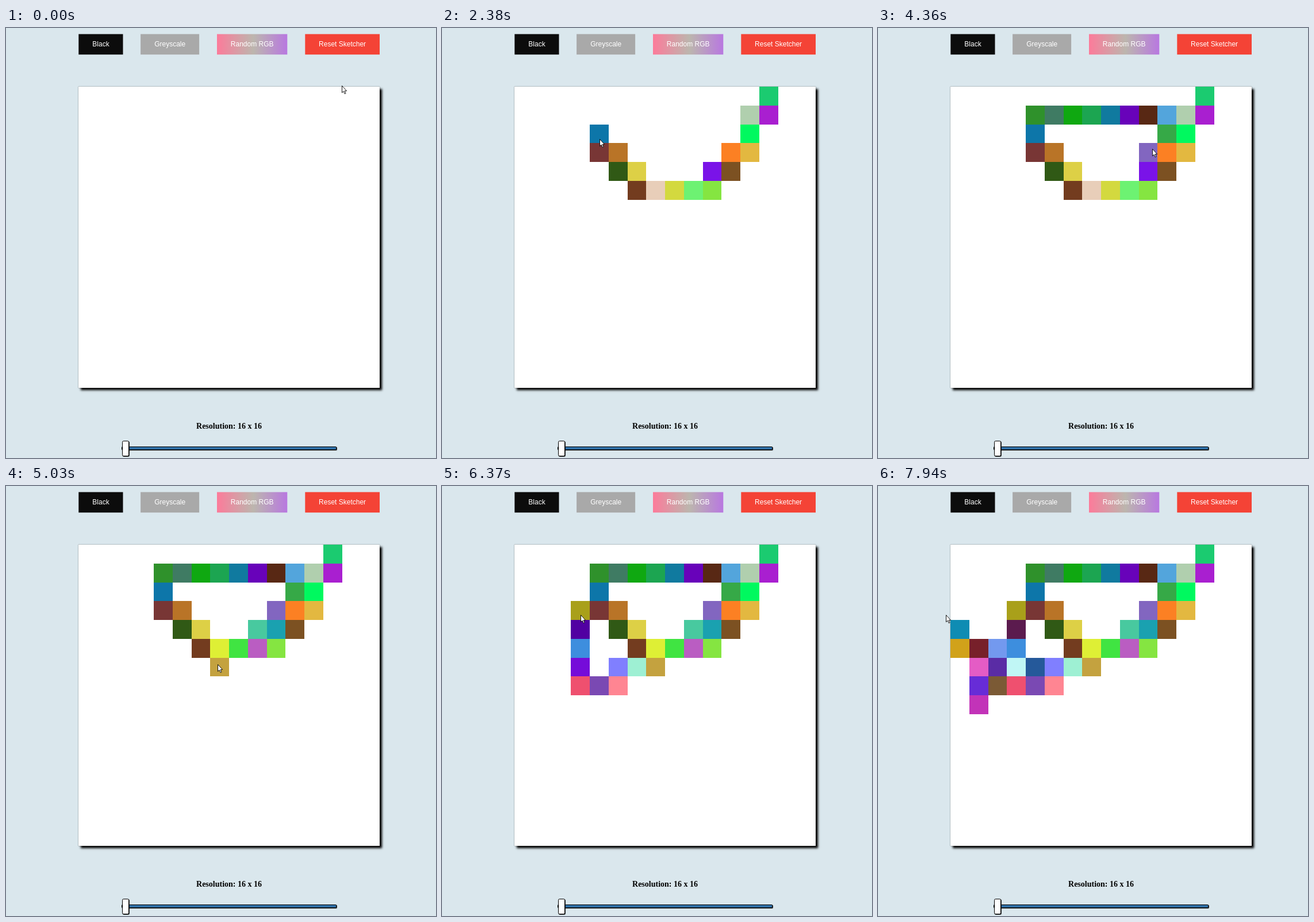
Recreate the animation shown at these times as an HTML page with a canvas. Size 748x748 px, loop 8 s.

```html
<!DOCTYPE html>
<html lang="en">
<head>
<meta charset="utf-8">
<title>Sketcher</title>
<style>
  html, body { margin: 0; width: 100%; height: 100%; overflow: hidden; }
  body { position: relative; background: #dae7ed; }
  canvas, svg { position: absolute; left: 0; top: 0; }
  #bar text { font: 12px Arial, "Liberation Sans", sans-serif; fill: #fff; text-anchor: middle; }
  .board {
    position: absolute; left: 126px; top: 102px; width: 524px; height: 524px;
    background: #fff; box-shadow: 3.75px 3.75px 3.75px #000, 0 0 1px #000;
  }
  .label {
    position: absolute; left: 126px; top: 685px; width: 524px; text-align: center;
    font: bold 14px/16px "Times New Roman", "Liberation Serif", serif; color: #000;
  }
  .track, .thumb {
    position: absolute; box-sizing: border-box;
    border: 1px solid #010101; box-shadow: .75px .75px .75px #000;
  }
  .track { left: 201px; top: 728px; width: 374px; height: 6px; background: #3071a9; border-radius: 1.5px; }
  .thumb { left: 202px; top: 718px; width: 12px; height: 27px; background: #fff; border-radius: 2.5px; }
  #cursor { overflow: visible; }
</style>
</head>
<body>
<svg id="bar" width="748" height="60">
  <linearGradient id="rgb">
    <stop stop-color="#fc7b9a"/>
    <stop offset=".52" stop-color="#bcb6ae"/>
    <stop offset="1" stop-color="#b878e0"/>
  </linearGradient>
  <rect x="126.3" y="10.6" width="77.2" height="35.6" fill="#0c0c0c"/>
  <rect x="234.1" y="10.6" width="102" height="35.6" fill="#a9a9a9"/>
  <rect x="367" y="10.6" width="122.3" height="35.6" fill="url(#rgb)"/>
  <rect x="520.3" y="10.6" width="129.7" height="35.6" fill="#f44336"/>
  <text x="165" y="32.3">Black</text>
  <text x="285.2" y="32.3">Greyscale</text>
  <text x="428.2" y="32.3">Random RGB</text>
  <text x="585.1" y="32.3">Reset Sketcher</text>
</svg>
<div class="board"></div>
<div class="label">Resolution: 16 x 16</div>
<div class="track"></div>
<div class="thumb"></div>
<canvas id="sketch" width="748" height="748"></canvas>
<svg id="cursor" width="10" height="16">
  <path d="M.5 .5V12.6L3.2 10.1 5.1 14.5 7 13.7 5.1 9.4H8.6Z" fill="#fff" stroke="#000" stroke-width=".9"/>
</svg>
<script>
const LOOP = 8000, TICK = 1000 / 15;
const LEFT = 126.3, TOP = 102.3, CELL = 32.73;
const REACH = 0.7;   // share of a move after which the next cell is painted

// Each stroke runs evenly from one time to another.
// A move is a compass direction ("-" rests) and the colour it paints.
const strokes = [
  [140, 960, 'S:1bcb70 S:a91fd0 W:b0cfae S:00f95f S:e3b840 W:fc8023 S:7c5122 W:7a13e8 S:85e541'],
  [1150, 1640, 'W:6df272 W:d3d93f W:e8ceb9 W:733c1f'],
  [1850, 2500, 'N:ddd046 W:305915 N:b97427 W:783635 N:0d76a9 N:2f912b'],
  [2670, 3370, 'E:3f7b63 E:0fa811 E:1ca551 E:107a9f E:6802ba'],
  [3640, 4120, 'E:582814 E:53a5dc S:36a947'],
  [4390, 5000, 'SW:8266c0 S:1aa1b0 W:48c99f S:ba5dc2 W:40e442 W:deef35 S:c4a23f'],
  [5130, 5820, 'W:9ef0d3 W:807fff S:ff8592 W:7a49b3 W:ef506f N:750cd9'],
  [5950, 6300, 'N:3d8ede N:5100a2 N:a9a01a'],
  [6450, 6700, 'S:5b1b4e SW:7399ef S:5a2ca5 S:7b5a35 W:672cd7'],
  [6890, 7120, 'S:c233b8 -'],
  [7190, 7400, 'N N:e45cc5 E E:c0f6f5 E:25599a'],
  [7530, 7930, '- W W N W:77202a W:d1a21a N:0f8cb3 NW']
];

const center = (start, n) => start + (n + 0.5) * CELL;
const edge = (start, n) => Math.round(start + n * CELL);

function buildStops() {
  const stops = [{ t: 60, x: 584, y: 100 }];
  let col = 13, row = -1;
  for (const [from, to, moves] of strokes) {
    const list = moves.split(' ');
    list.forEach((move, i) => {
      const [dir, color] = move.split(':');
      col += dir.includes('E') - dir.includes('W');
      row += dir.includes('S') - dir.includes('N');
      stops.push({
        t: from + (to - from) * i / (list.length - 1),
        x: center(LEFT, col), y: center(TOP, row), col, row, color
      });
    });
  }
  stops.forEach((s, i) => {
    const before = stops[Math.max(0, i - 1)].t;
    s.paintAt = before + (s.t - before) * REACH;
  });
  return stops;
}

const stops = buildStops();
const ctx = document.getElementById('sketch').getContext('2d');
const cursor = document.getElementById('cursor');

function along(t) {
  const i = stops.findIndex(s => s.t > t);
  if (i === 0) return stops[0];
  if (i < 0) return stops[stops.length - 1];
  const a = stops[i - 1], b = stops[i], k = (t - a.t) / (b.t - a.t);
  return { x: a.x + (b.x - a.x) * k, y: a.y + (b.y - a.y) * k };
}

// averaging two nearby points rounds off the corners
function pointer(t) {
  const a = along(t - 30), b = along(t + 30);
  return { x: (a.x + b.x) / 2, y: (a.y + b.y) / 2 };
}

function draw(now) {
  const t = Math.floor(now % LOOP / TICK) * TICK;
  ctx.clearRect(0, 0, 748, 748);
  for (const { paintAt, col, row, color } of stops) {
    if (!color || paintAt > t) continue;
    const x = edge(LEFT, col), y = edge(TOP, row);
    ctx.fillStyle = '#' + color;
    ctx.fillRect(x, y, edge(LEFT, col + 1) - x, edge(TOP, row + 1) - y);
  }
  const { x, y } = pointer(t);
  cursor.style.transform = `translate(${Math.round(x)}px, ${Math.round(y)}px)`;
}

function tick() {
  draw(performance.now());
  requestAnimationFrame(tick);
}
tick();
</script>
</body>
</html>
```
